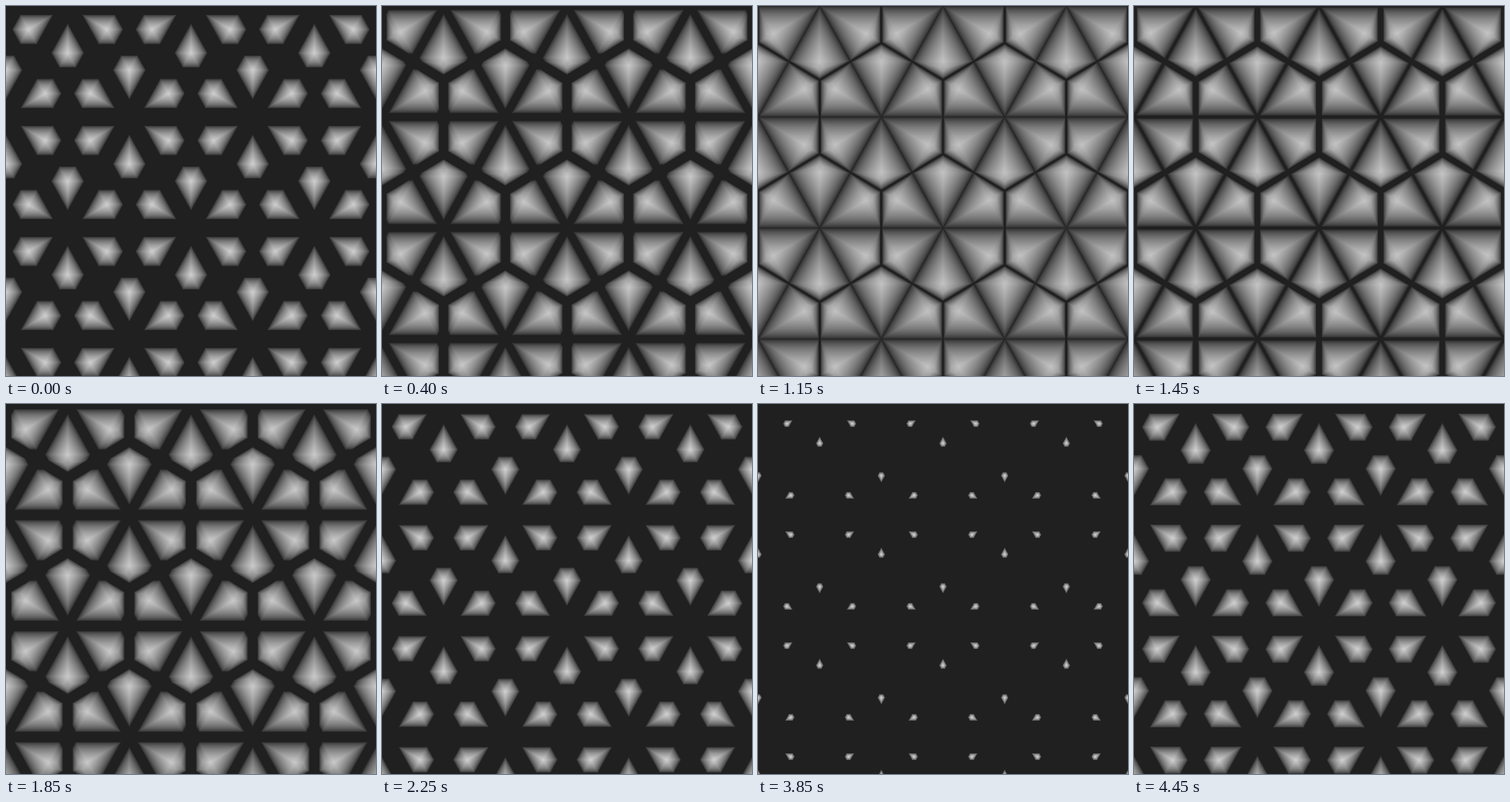
An HTML page with a canvas for the animation above (4.5 s loop, 500 by 500 pixels).

```html
<!DOCTYPE html>
<html lang="en">
<head>
<meta charset="utf-8">
<title>Kite tiling</title>
<style>
  html, body { margin: 0; width: 100%; height: 100%; overflow: hidden; background: #202020; }
  canvas { display: block; }
</style>
</head>
<body>
<canvas id="stage" width="500" height="500"></canvas>
<script>
const SIZE = 500, SIDE = 500 / 3, HEIGHT = 150;
const LOOP = 4500, STEP = 50, PEAK = 1075;
const DARK = 32;

const ctx = document.getElementById('stage').getContext('2d');
const image = ctx.createImageData(SIZE, SIZE);
const pixels = new Uint32Array(image.data.buffer);

// Sorted barycentric coordinates in the triangle grid: equal for every kite.
const least = new Float32Array(SIZE * SIZE);
const most = new Float32Array(SIZE * SIZE);

const clamp = v => Math.max(0, Math.min(1, v));
const fract = v => v - Math.floor(v);

for (let y = 0, k = 0; y < SIZE; y++) {
  for (let x = 0; x < SIZE; x++, k++) {
    const row = (y + 0.5) / HEIGHT;
    const i = fract((x + 0.5) / SIDE - 0.5 + row / 2);
    const j = fract(row);
    const hi = Math.max(i, j), lo = Math.min(i, j);
    least[k] = Math.min(1 - hi, hi - lo, lo);
    most[k] = Math.max(1 - hi, hi - lo, lo);
  }
}

// Each kite holds a bevelled hexagon with one corner drawn out to a tip,
// cut off by a gap along the lines where neighbouring kites meet.
function draw(time) {
  const phase = 2 * Math.PI * (time - PEAK) / LOOP;
  const size = (1 + Math.cos(phase)) / 2;
  const gap = 0.6 + 12 * Math.abs(Math.sin(phase / 2));
  const light = 190 - 28 * size;
  const inner = (1 - size) / 6, outer = 1 / 6 + size / 3, base = 2 / 3 - size * 5 / 12;
  for (let k = 0; k < pixels.length; k++) {
    const a = most[k], c = least[k], b = 1 - a - c;
    const bevel = Math.min(c - inner, outer - b, a - base) * 4 / size;
    const spoke = ((a - b) * 85.7 - gap) / 14;
    const grey = Math.round(DARK + light * clamp(Math.min(bevel, spoke)) ** 0.6);
    pixels[k] = 0xff000000 | grey * 0x010101;
  }
  ctx.putImageData(image, 0, 0);
}

let shown = -1;
function tick() {
  const time = Math.floor(performance.now() % LOOP / STEP) * STEP;
  if (time !== shown) draw(shown = time);
  requestAnimationFrame(tick);
}
tick();
</script>
</body>
</html>
```
